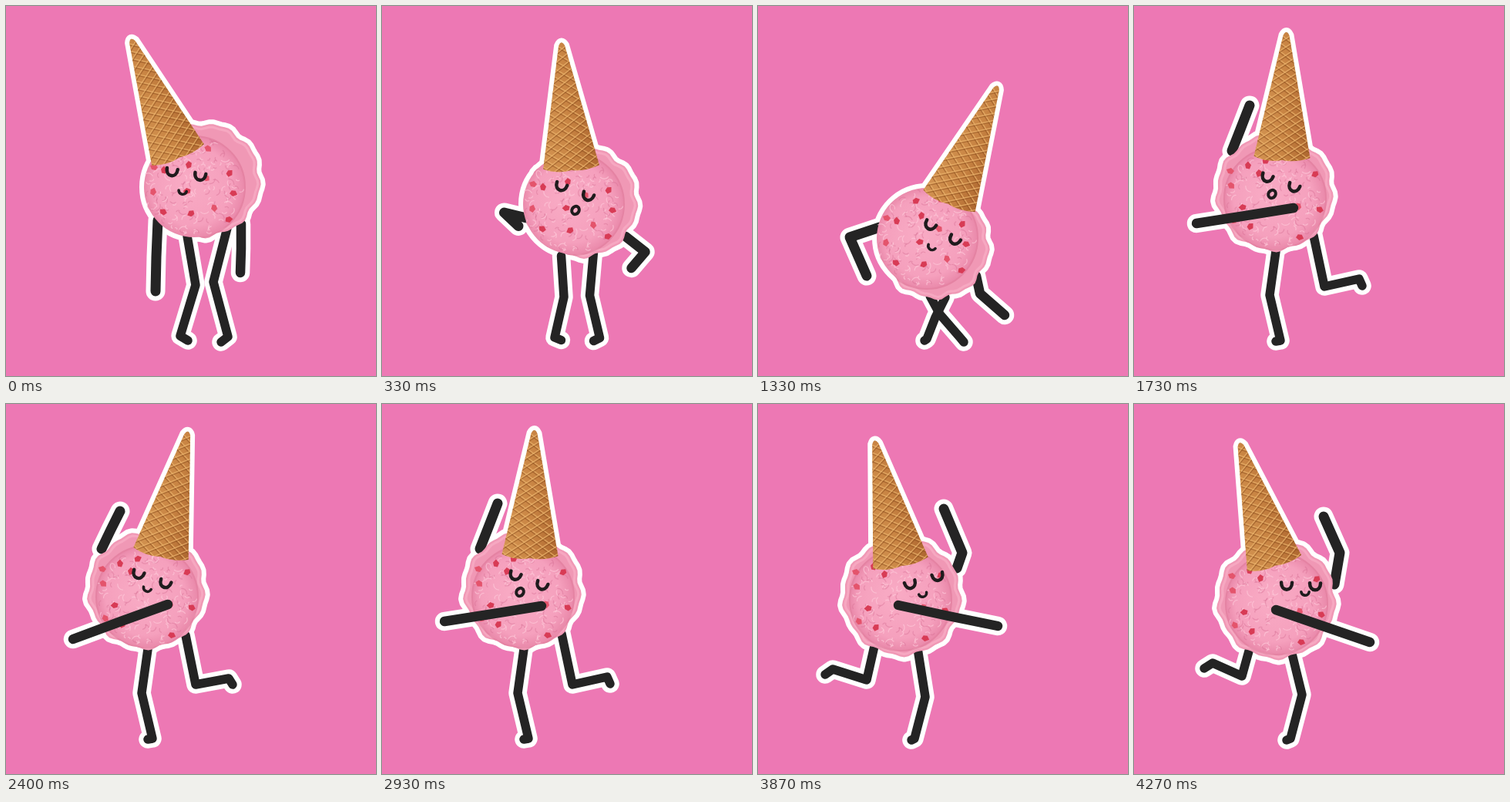
These frames come from a looping animation (480 px wide and 480 px high, 4.34 s). An HTML page with a canvas:

```html
<!DOCTYPE html>
<html lang="en">
<head>
<meta charset="utf-8">
<title>Dancing ice cream</title>
<style>
html, body { margin: 0; width: 100%; height: 100%; overflow: hidden; background: #ed78b4; }
canvas { display: block; width: 100vw; height: 100vh; }
</style>
</head>
<body>
<canvas id="stage" width="480" height="480"></canvas>
<script>
const ctx = document.getElementById('stage').getContext('2d');
const LOOP = 4340, STEPS = 65, STEP = LOOP / STEPS;
const INK = '#242424', RIM = 12, TAU = Math.PI * 2;
const CONE_H = 162, CONE_W = 36.5, SCOOP_R = 65;

// Pose parts: scoop x, y / skirt x, y, radius / cone x, y, degrees /
// face centre x, y, degrees, mouth x, y / arms a, b / legs l, r as x, y pairs.
const slump = {
  scoop: [244, 235], skirt: [256, 226, 73], cone: [223, 193, -22], face: [233.5, 218, 9, 229, 241],
  a: [197, 278, 195, 325, 194, 370], b: [305, 283, 305, 315, 304, 346],
  l: [235, 298, 246, 362, 226, 428, 236, 434], r: [287, 288, 269, 358, 288, 429, 279, 436]
};
const hips = {
  scoop: [256, 297], skirt: [267, 301, 69], cone: [258, 237, 2.5], face: [270, 281, 31, 277, 307], ooh: true,
  a: [192, 286, 163, 251, 212, 243], b: [330, 336, 357, 353, 315, 355],
  l: [234, 368, 228, 402, 222, 432, 229, 433], r: [266, 368, 272, 402, 277, 432, 270, 433]
};
const cross = {
  scoop: [219, 301], skirt: [231, 311, 68], cone: [248, 253, 22.8], face: [239, 294, 31, 225, 313],
  a: [158, 287, 119, 300, 141, 350], b: [283, 350, 288, 373, 320, 401],
  l: [243, 378, 230, 404, 219, 432, 216, 434], r: [223, 376, 236, 400, 262, 430, 267, 436]
};
const pointLeft = {
  scoop: [183, 250], skirt: [182, 242, 75], cone: [192, 196, 2], face: [190, 229, 20, 179, 244], ooh: true, front: true,
  a: [127, 188, 138, 160, 150, 129], b: [207, 262, 145, 272, 81, 282],
  l: [185, 311, 176, 375, 190, 434, 184, 435], r: [233, 298, 247, 364, 292, 354, 296, 363]
};
const pointLeftLow = {
  ...pointLeft, cone: [201, 194, 12.5], face: [189, 227, 19, 183, 240], ooh: false,
  a: [124, 188, 136, 163, 148, 139], b: [210, 260, 149, 282, 87, 305],
  r: [233, 300, 246, 364, 289, 356, 294, 364]
};
const pointRight = {
  scoop: [185, 250], skirt: [187, 246, 76], cone: [185, 202, -12], face: [215.5, 225, -16, 214, 243], ooh: true, front: true,
  a: [258, 209, 265, 189, 241, 132], b: [182, 257, 247, 271, 311, 284],
  l: [152, 310, 142, 360, 101, 354, 95, 363], r: [207, 313, 217, 378, 203, 434, 199, 436]
};
const pointRightLow = {
  ...pointRight, scoop: [185, 259], skirt: [185, 254, 76], cone: [182, 206, -16], face: [216.5, 236, 1, 222, 245], ooh: false,
  a: [260, 234, 267, 193, 246, 146], b: [184, 267, 245, 288, 306, 309],
  l: [150, 317, 140, 353, 102, 336, 91, 343], r: [204, 320, 218, 377, 203, 434, 198, 436]
};

// Moves the body; knees follow halfway and feet stay planted.
function lean(pose, dx, dy, extra) {
  const out = { ...pose };
  const add = (list, count, k = 1) => list.map((v, i) => i < count ? v + (i % 2 ? dy : dx) * k : v);
  for (const key of ['scoop', 'skirt', 'cone']) out[key] = add(pose[key], 2);
  out.face = add(add(pose.face, 2), 0).map((v, i) => i === 3 ? v + dx : i === 4 ? v + dy : v);
  for (const key of ['a', 'b']) out[key] = add(pose[key], 6);
  for (const key of ['l', 'r']) {
    out[key] = pose[key].map((v, i) => v + (i % 2 ? dy : dx) * (i < 2 ? 1 : i < 4 ? .5 : 0));
  }
  return { ...out, ...extra };
}

const reach = lean(slump, 4, -28, {
  cone: [238, 170, -2], a: [195, 255, 162, 275, 150, 318], b: [310, 252, 334, 275, 340, 315]
});
const squat = lean(hips, -8, 10, { cone: [253, 248, -7] });
const sway = lean(hips, -22, -3, { cone: [247, 233, 13], ooh: false });
const swing = lean(pointLeft, 8, 22, {
  cone: [208, 215, 16], ooh: false, a: [140, 245, 92, 240, 46, 222], b: [218, 300, 185, 325, 128, 350]
});
const kickLeft = lean(pointLeftLow, 0, 2, { cone: [197, 196, 8], r: [233, 302, 247, 360, 298, 342, 308, 350] });
const turn = lean(pointRight, 0, 9, {
  cone: [190, 207, -3], face: [204, 236, 2, 200, 252],
  a: [252, 232, 298, 228, 344, 210], b: [194, 268, 205, 318, 228, 364],
  l: [170, 318, 160, 368, 150, 415, 143, 421], r: [217, 315, 230, 373, 238, 424, 244, 428]
});
const kickRight = lean(pointRight, 0, 4, { ooh: false, l: [151, 314, 141, 358, 97, 344, 87, 351] });

const timeline = [
  [0, slump], [3, reach], [7, squat], [11, hips], [12, hips], [16, sway], [20, cross], [23, swing],
  [26, pointLeft], [31, kickLeft], [36, pointLeftLow], [40, kickLeft], [44, pointLeft],
  [48, turn], [51, pointRight], [58, kickRight], [64, pointRightLow]
];

const berriesA = [[-52, -26], [-39, -22], [-14, -48], [18, -50], [-7, -29], [-9, 5], [16, -12], [46, -18], [51, 8],
  [26, 27], [-4, 34], [-40, 32], [-53, 6], [45, 42]];
const berriesB = [[-58, -36], [-35, -43], [-12, -49], [-57, -17], [-21, -33], [-42, 11], [-54, 28], [-32, 36],
  [32, 50], [30, 10], [52, -32], [58, 14]];

function seeded(seed) {
  return () => (seed = (seed * 16807) % 2147483647) / 2147483647;
}
const rand = seeded(77);
const grain = Array.from({ length: 190 }, () => {
  const a = rand() * TAU, d = Math.sqrt(rand()) * 61;
  return { x: Math.cos(a) * d, y: Math.sin(a) * d, r: 2 + rand() * 5, turn: rand() * TAU, light: rand() < .55 };
});

function poseAt(step) {
  let i = 0;
  while (i < timeline.length - 2 && timeline[i + 1][0] <= step) i++;
  const [s0, p] = timeline[i], [s1, q] = timeline[i + 1];
  const u = (step - s0) / (s1 - s0), k = u * u * (3 - 2 * u);
  const near = k < .5 ? p : q, out = { ...near };
  out.ooh = !!near.ooh;
  out.front = !!near.front;
  for (const key of ['scoop', 'skirt', 'cone', 'face', 'a', 'b', 'l', 'r']) {
    out[key] = p[key].map((v, n) => v + (q[key][n] - v) * k);
  }
  return out;
}

function stroke(path, width, color) {
  ctx.lineWidth = width;
  ctx.strokeStyle = color;
  ctx.stroke(path);
}

function limbPath(pts) {
  const path = new Path2D();
  for (let i = 0; i < pts.length; i += 2) path.lineTo(pts[i], pts[i + 1]);
  return path;
}

function skirtPath([x, y, r]) {
  const path = new Path2D();
  for (let i = 0; i < 90; i++) {
    const a = i / 90 * TAU, d = r + 1.6 * Math.sin(a * 9) + 1.2 * Math.sin(a * 17 + 1);
    path.lineTo(x + Math.cos(a) * d, y + Math.sin(a) * d);
  }
  path.closePath();
  return path;
}

function circle(x, y, r) {
  const path = new Path2D();
  path.arc(x, y, r, 0, TAU);
  return path;
}

const conePath = new Path2D(
  `M${-CONE_W} 0L-4 ${4 - CONE_H}Q0 ${-CONE_H - 4} 4 ${4 - CONE_H}L${CONE_W} 0Q18 7 0 4Q-18 8 ${-CONE_W} 0Z`);

function place(x, y, deg, draw) {
  ctx.save();
  ctx.translate(x, y);
  ctx.rotate(deg * Math.PI / 180);
  draw();
  ctx.restore();
}

function drawCone() {
  const tone = ctx.createLinearGradient(-CONE_W, 0, CONE_W, 0);
  tone.addColorStop(0, '#d39452');
  tone.addColorStop(.5, '#c98544');
  tone.addColorStop(1, '#ad662f');
  ctx.fillStyle = tone;
  ctx.fill(conePath);
  ctx.clip(conePath);
  // Waffle ridges, each with a thin shadow beside it.
  for (const side of [-1, 1]) {
    const ridges = new Path2D(), shade = new Path2D();
    for (let y = -230; y < 70; y += 11) {
      ridges.moveTo(-45 * side, y + 30);
      ridges.lineTo(45 * side, y - 32);
      shade.moveTo(-45 * side, y + 32);
      shade.lineTo(45 * side, y - 30);
    }
    stroke(shade, 1.3, 'rgba(139,78,31,.5)');
    stroke(ridges, 1.4, 'rgba(232,177,106,.75)');
  }
}

function drawScoop(p) {
  const [x, y] = p.scoop, skirt = skirtPath(p.skirt), ball = circle(x, y, SCOOP_R);
  ctx.fillStyle = '#f098b5';
  ctx.fill(skirt);
  ctx.save();
  ctx.clip(skirt);
  stroke(skirtPath([p.skirt[0], p.skirt[1], p.skirt[2] - 4]), 3, 'rgba(250,178,202,.6)');
  stroke(ball, 4, 'rgba(205,92,130,.35)');
  ctx.restore();
  const glow = ctx.createRadialGradient(x - 10, y - 5, 10, x, y, SCOOP_R);
  glow.addColorStop(0, '#f8a9c3');
  glow.addColorStop(.75, '#f5a0bd');
  glow.addColorStop(1, '#ea8aab');
  ctx.fillStyle = glow;
  ctx.fill(ball);
  place(x, y, 0, () => {
    ctx.lineWidth = 1.3;
    for (const g of grain) {
      ctx.strokeStyle = g.light ? 'rgba(255,205,220,.6)' : 'rgba(213,108,146,.4)';
      ctx.beginPath();
      ctx.arc(g.x, g.y, g.r, g.turn, g.turn + 1.6);
      ctx.stroke();
    }
    (p.front ? berriesB : berriesA).forEach(([bx, by], i) => place(bx, by, i * 67, () => {
      ctx.fillStyle = i % 3 ? '#d83b55' : '#e4546c';
      ctx.fill(new Path2D('M-5 -2L1 -4L5 0L2 4L-3 3Z'));
    }));
  });
}

function drawFace([x, y, deg, mx, my], ooh) {
  place(x, y, deg, () => {
    const eyes = new Path2D();
    for (const ex of [-18.5, 18.5]) {
      eyes.moveTo(ex - 7, -4);
      eyes.bezierCurveTo(ex - 7, 8, ex + 7, 8, ex + 7, -4);
    }
    stroke(eyes, 4.5, '#1f1b1d');
  });
  place(mx, my, deg, () => {
    const mouth = new Path2D();
    if (ooh) mouth.ellipse(0, 0, 4.6, 5.4, .2, 0, TAU);
    else mouth.arc(0, -2, 5.2, .15, Math.PI - .15);
    stroke(mouth, ooh ? 4 : 3.6, '#1f1b1d');
  });
}

function draw(p) {
  ctx.fillStyle = '#ed78b4';
  ctx.fillRect(0, 0, 480, 480);
  ctx.lineCap = ctx.lineJoin = 'round';
  const limbs = { l: 11.5, r: 11.5, a: 13, b: 12.5 };
  const limb = (key, rim) => stroke(limbPath(p[key]), limbs[key] + (rim || 0), rim ? '#fff' : INK);

  for (const key in limbs) limb(key, RIM);
  stroke(skirtPath(p.skirt), RIM, '#fff');
  stroke(circle(...p.scoop, SCOOP_R), RIM, '#fff');
  place(...p.cone, () => stroke(conePath, RIM, '#fff'));

  for (const key of ['l', 'r', 'a']) limb(key);
  if (!p.front) limb('b');
  drawScoop(p);
  place(...p.cone, drawCone);
  drawFace(p.face, p.ooh);
  if (p.front) limb('b');
}

let start, shown = -1;
function tick(now) {
  start ??= now;
  const step = Math.floor(((now - start) % LOOP + 8) / STEP) % STEPS;
  if (step !== shown) draw(poseAt(shown = step));
  requestAnimationFrame(tick);
}
draw(poseAt(0));
requestAnimationFrame(tick);
</script>
</body>
</html>
```
